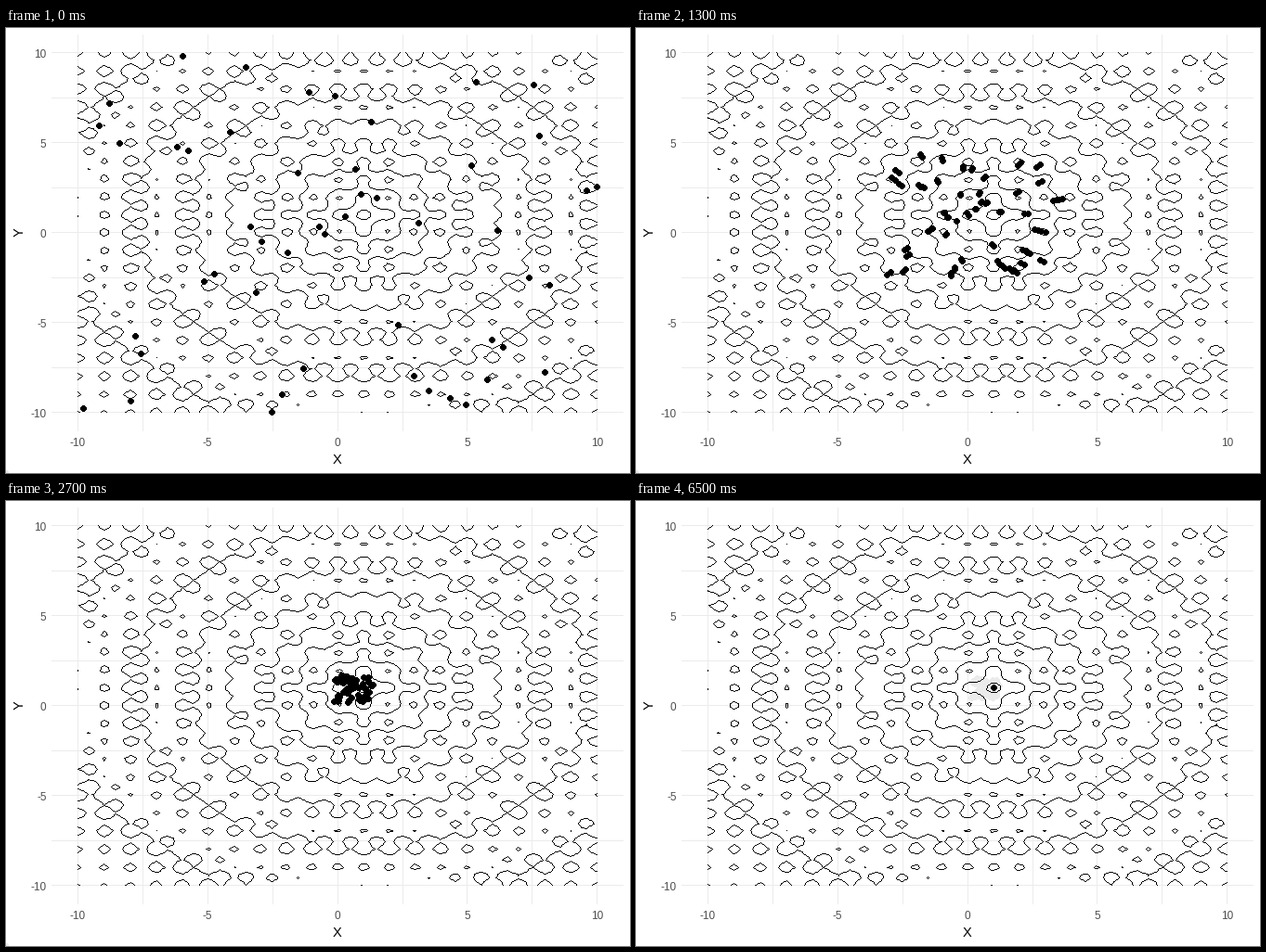
These frames come from a looping animation (672x480 px, 10000 ms). A matplotlib script:

```python
import numpy as np
import matplotlib.pyplot as plt
from matplotlib.animation import FuncAnimation

W, H, DPI = 672, 480, 96
FRAMES, INTERVAL = 100, 100
LEFT, RIGHT, TOP, BOTTOM = 49.6, 664.67, 7.33, 434.1
GRID, INK, TICK = (235, 235, 235, 255), (0, 0, 0, 255), "#4D4D4D"
TRAIL_FROM, TRAIL_TO = 30, 55      # frames whose dots leave a pale trail
PARTICLES = 50

# Iteration, x and y of the point the swarm heads for
GOALS = np.array([(13, 0.94, 2.17), (26, 0.3, 1.46),
                  (43, 0.53, 1.02), (80, 1.01, 1)])


def to_x(v):
    return (LEFT + RIGHT) / 2 + v * (RIGHT - LEFT) / 22


def to_y(v):
    return (TOP + BOTTOM) / 2 - v * (BOTTOM - TOP) / 22


def ackley(x, y):
    x, y = x - 1, y - 1
    bowl = -20 * np.exp(-0.2 * np.sqrt((x**2 + y**2) / 2))
    waves = -np.exp((np.cos(2 * np.pi * x) + np.cos(2 * np.pi * y)) / 2)
    return bowl + waves + 20 + np.e


axis = np.linspace(-10, 10, 100)
rng = np.random.default_rng(11)
start = np.column_stack([rng.choice(axis, PARTICLES, replace=False),
                         rng.choice(axis, PARTICLES, replace=False)])
start[:2] = (0.91, 2.12), (-0.71, 0.3)     # the first two leaders


def swarm(k):
    """Particles after k iterations: a slow start, then steady shrinking."""
    size = np.exp(0.36 * (1 - np.exp(-k / 12)) - 0.0556 * k)
    goal = np.array([np.interp(k, GOALS[:, 0], GOALS[:, c]) for c in (1, 2)])
    return goal + size * (start - goal)


def dots_at(i):
    """Each frame shows two successive iterations, on whole pixels."""
    both = np.vstack([swarm(max(2 * i - 1, 0)), swarm(2 * i)])
    pixels = np.column_stack([to_x(both[:, 0]), to_y(both[:, 1])])
    return np.unique(np.floor(pixels), axis=0)


def trace(layer, points, color):
    """Draw a hard-edged line, one pixel wide."""
    points = np.floor(points).astype(int)
    for a, b in zip(points[:-1], points[1:]):
        t = np.linspace(0, 1, np.abs(b - a).max() + 1)[:, None]
        x, y = np.round(a + (b - a) * t).astype(int).T
        layer[y, x] = color


fig = plt.figure(figsize=(W / DPI, H / DPI), dpi=DPI, facecolor="white")
ax = fig.add_axes([0, 0, 1, 1])
ax.axis("off")

grid = np.zeros((H, W, 4), np.uint8)
for v in np.arange(-10, 10.1, 2.5):
    trace(grid, [(to_x(v), TOP), (to_x(v), BOTTOM)], GRID)
    trace(grid, [(LEFT, to_y(v)), (RIGHT, to_y(v))], GRID)

ink = np.zeros((H, W, 4), np.uint8)
gx, gy = np.meshgrid(axis, axis)
contours = ax.contour(to_x(gx), to_y(gy), ackley(gx, gy),
                      levels=np.arange(2, 20, 2))
for level in contours.allsegs:
    for line in level:
        trace(ink, line, INK)
contours.remove()

for layer, order in ((grid, 1), (ink, 3)):
    ax.imshow(layer, interpolation="nearest", aspect="auto", zorder=order)

plt.rcParams["font.family"] = "Liberation Sans"
for v in range(-10, 11, 5):
    ax.text(to_x(v) - 0.9, 450.5, str(v), size=8.8, color=TICK,
            ha="center", va="baseline")
    ax.text(43, to_y(v) + 5, str(v), size=8.8, color=TICK,
            ha="right", va="baseline")
ax.text(356, 469.7, "X", size=11, ha="center", va="baseline")
ax.text(14.5, 220, "Y", size=11, rotation=90, ha="center", va="center")


def dot_layer(color, zorder):
    # Hard edges widen the disc to seven pixels
    return ax.scatter([], [], s=(5.5 * 72 / DPI) ** 2, c=color, linewidths=0,
                      edgecolors="none", antialiased=False, zorder=zorder)


trail = dot_layer("#EBEBEB", 2)
dots = dot_layer("black", 4)

# Whole numbers fall on pixel centres
ax.set_xlim(-0.5, W - 0.5)
ax.set_ylim(H - 0.5, -0.5)


def update(i):
    dots.set_offsets(dots_at(i))
    past = [dots_at(j) for j in range(TRAIL_FROM, min(i, TRAIL_TO))]
    spots = np.unique(np.vstack(past), axis=0) if past else np.empty((0, 2))
    trail.set_offsets(spots)
    return trail, dots


anim = FuncAnimation(fig, update, frames=FRAMES, interval=INTERVAL,
                     repeat=True, repeat_delay=0)
plt.show()
```
